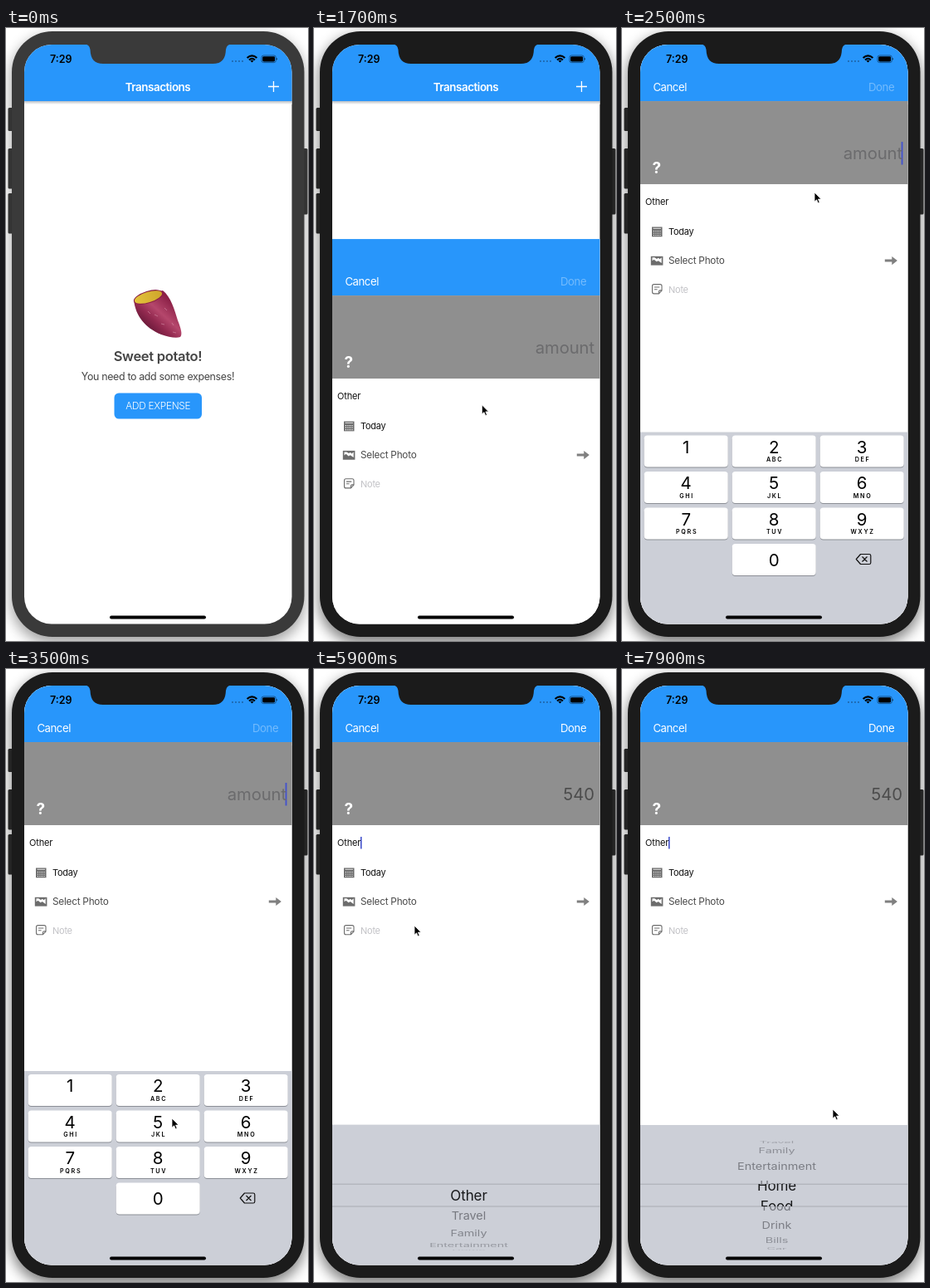
An HTML page that plays this animation: 364 by 738 pixels, repeating every 8000 ms.

```html
<!DOCTYPE html>
<html lang="en">
<head>
<meta charset="utf-8">
<title>Expense entry</title>
<style>
html, body { margin: 0; width: 100%; height: 100%; overflow: hidden; background: #fff; }
svg { display: block; width: 364px; height: 738px; font-family: Inter, Roboto, sans-serif; }
</style>
</head>
<body>
<svg id="stage" viewBox="0 0 364 738" xmlns="http://www.w3.org/2000/svg">
  <defs>
    <filter id="blur" x="-20%" y="-20%" width="140%" height="140%"><feGaussianBlur stdDeviation="8"/></filter>
    <clipPath id="screen"><rect x="22" y="20" width="322.5" height="697.5" rx="33"/></clipPath>
    <clipPath id="band"><rect x="22" y="620" width="323" height="27"/></clipPath>
    <clipPath id="rest"><rect x="22" y="549" width="323" height="71"/><rect x="22" y="647" width="323" height="71"/></clipPath>
    <linearGradient id="edge" x2="0" y2="1"><stop stop-color="#b9bec4"/><stop offset="1" stop-color="#fff"/></linearGradient>
    <linearGradient id="skin" x1=".75" y1=".2" x2=".2" y2=".8">
      <stop stop-color="#8c2147"/><stop offset=".4" stop-color="#b5476c"/>
      <stop offset=".65" stop-color="#932a50"/><stop offset="1" stop-color="#5f1433"/>
    </linearGradient>
    <linearGradient id="flesh" x2="1" y2="0"><stop stop-color="#e3c33c"/><stop offset="1" stop-color="#cfa52b"/></linearGradient>
  </defs>

  <rect width="364" height="738" fill="#fff"/>
  <rect id="shadow" x="6" y="9" width="354" height="732" rx="50" fill="#000" filter="url(#blur)"/>
  <g id="sides">
    <rect x="2.5" y="96" width="7" height="28" rx="1.5"/>
    <rect x="2.5" y="145" width="7" height="48.5" rx="1.5"/>
    <rect x="2.5" y="199" width="7" height="48.5" rx="1.5"/>
    <rect x="356" y="145" width="7.5" height="79.5" rx="1.5"/>
  </g>
  <rect class="shell" x="7" y="4" width="352.5" height="729" rx="49"/>

  <g clip-path="url(#screen)">
    <rect x="22" y="20" width="323" height="698" fill="#fff"/>
    <g id="home">
      <rect x="22" y="88" width="323" height="4" fill="url(#edge)"/>
      <rect x="22" y="20" width="323" height="68" fill="#2896fb"/>
      <path d="M316 70.5h13M322.5 64v13" stroke="#fff" stroke-width="1.3"/>
      <path d="M154 327C156 347 168 361 187 369C196 372 205 374 210 372C213 369 211 362 207 352C203 339 199 324 189 316Z" fill="url(#skin)"/>
      <path d="M179 345l4 2M191 337l3 3M187 356l4 1M200 355l2 3M171 341l3 3M201 366l4 1" stroke="#d590a8" stroke-width="1" opacity=".6"/>
      <ellipse cx="171.5" cy="324" rx="18.3" ry="7.4" transform="rotate(-17 171.5 324)" fill="#8a2045"/>
      <ellipse cx="171.5" cy="324" rx="17.2" ry="6.2" transform="rotate(-17 171.5 324)" fill="url(#flesh)"/>
      <rect x="130.5" y="439.5" width="105.5" height="31" rx="5.5" fill="#2896fb"/>
    </g>

    <g id="modal">
      <rect x="22" y="20" width="323" height="698" fill="#fff"/>
      <rect x="22" y="20" width="323" height="68" fill="#2896fb"/>
      <rect x="22" y="88" width="323" height="100" fill="#8f8f8f"/>
      <g fill="none" stroke="#6c6c6c">
        <path d="M36 239.5h12.5v11.8H36z" fill="#6c6c6c" stroke="none"/>
        <path d="M37.5 241.3h9.5" stroke="#fff" stroke-width=".8"/>
        <path d="M37.8 244.5h9M37.8 247h9M37.8 249.5h9" stroke="#fff" stroke-width="1.1" stroke-dasharray="1.2 1.3"/>
        <path d="M34.8 274.8h14.6v10.8H34.8z" fill="#6c6c6c" stroke="none"/>
        <path d="M36.5 276.3v4l2-1.6 3.2 2.6 2-1.2 4 2.8v-6.6l-2.2 2-1.6-1.5-2 1.2-2.6-1.7z" fill="#fff" stroke="none"/>
        <path d="M38.5 308.6h7.5q2 0 2 2v5.4l-3.6 3.8h-5.9q-2 0-2-2v-7.2q0-2 2-2zM48 315.8h-2q-1.6 0-1.6 1.6v2.4M39 312h6.3M39 314.7h3.6" stroke-width="1.1"/>
        <path d="M316.8 278.5h8.5v-3.6l6.6 5.1-6.6 5.1v-3.6h-8.5z" fill="#808080" stroke="none"/>
      </g>
      <rect id="sumCaret" x="336.6" y="137" width="1.9" height="27.5" fill="#4453cc"/>
      <rect id="kindCaret" x="56" y="202" width="1.6" height="14.5" fill="#4453cc"/>
    </g>

    <g id="panel"><rect x="22" y="484" width="323" height="240" fill="#cccfd7"/><g id="pad"></g></g>
    <g id="picker">
      <path d="M22 620.2h323M22 647h323" stroke="#a9abb2" stroke-width="1"/>
      <g id="dim" clip-path="url(#rest)"></g>
      <g id="lit" clip-path="url(#band)"></g>
    </g>
  </g>

  <path class="shell" d="M94 19Q101 20 101.5 26C102 38 107 43 117 43H249.5C259.5 43 264.5 38 265 26Q265.500 20 272.500 19Z"/>
  <g id="status">
    <g fill="#1c5c99"><circle cx="273" cy="40" r=".9"/><circle cx="277" cy="40" r=".9"/><circle cx="281" cy="40" r=".9"/><circle cx="285" cy="40" r=".9"/></g>
    <g fill="none" stroke="#000" stroke-width="2.1">
      <path d="M290.600 36.100Q296.500 30.600 302.400 36.100M293 38.600Q296.500 35.300 300 38.600"/>
      <path d="M296.500 41.600l-2-2.100q2-1.500 4 0z" fill="#000" stroke="none"/>
    </g>
    <rect x="308" y="33" width="17.300" height="8.600" rx="2.400" fill="none" stroke="#124674" stroke-width=".8"/>
    <rect x="309.200" y="34.200" width="14.900" height="6.200" rx="1.400"/>
    <path d="M326.300 35.800q1.600 1.500 0 3z"/>
  </g>
  <rect x="125" y="707.500" width="116" height="4" rx="2" fill="#000"/>
  <path id="cursor" d="M0 0V11.200L2.600 8.800L4.300 12.800L6.200 12L4.500 8.100H8.100Z" fill="#000" stroke="#fff" stroke-width=".8"/>
</svg>

<script>
const LOOP = 8000;
const $ = id => document.getElementById(id);

function add(parent, tag, attrs, text) {
  const el = document.createElementNS('http://www.w3.org/2000/svg', tag);
  for (const k in attrs) el.setAttribute(k, attrs[k]);
  if (text !== undefined) el.textContent = text;
  parent.append(el);
  return el;
}

function label(parent, text, x, y, size, fill, spacing = 0, extra = {}) {
  return add(parent, 'text', {x, y, fill, 'font-size': size, 'letter-spacing': spacing, ...extra}, text);
}

const MID = {'text-anchor': 'middle'}, END = {'text-anchor': 'end'};
const SEMI = {'font-weight': 600};

label($('status'), '7:29', 53, 41.7, 12.5, '#000', 0, SEMI);

const home = $('home');
label(home, 'Transactions', 183, 75.6, 13.4, '#fff', -.45, {...MID, ...SEMI});
label(home, 'Sweet potato!', 183, 401.3, 16.5, '#444', -.3, {...MID, ...SEMI});
label(home, 'You need to add some expenses!', 183, 423.5, 12.4, '#444', -.33, MID);
label(home, 'ADD EXPENSE', 183.3, 459.2, 11.8, '#fff', -.26, {...MID, 'font-weight': 300});

const modal = $('modal');
label(modal, 'Cancel', 37.4, 75.7, 13.2, '#fff', -.45);
const done = label(modal, 'Done', 297, 75.7, 13.2, '#fff', -.4);
const sum = label(modal, '', 338, 158, 20.3, '#4c4c4c', -.1, END);
label(modal, '?', 36.6, 174.8, 19, '#fff', 0, {'font-weight': 700});
label(modal, 'Other', 28, 213.2, 11, '#111', -.15);
label(modal, 'Today', 56, 249, 11, '#111', -.3);
label(modal, 'Select Photo', 56, 284.1, 11.8, '#4a4a4a', -.25);
label(modal, 'Note', 56, 319.2, 11, '#c2c2c6', -.25);

// Number pad
const letters = ['', 'ABC', 'DEF', 'GHI', 'JKL', 'MNO', 'PQRS', 'TUV', 'WXYZ'];
const keys = {};
function addKey(digit, col, row) {
  const x = 26.7 + col * 106, y = 488 + row * 43.5, cx = x + 50.5;
  const size = {x, width: 101, height: 38, rx: 4};
  add($('pad'), 'rect', {...size, y: y + 1, fill: '#8c8f96'});
  keys[digit] = add($('pad'), 'rect', {...size, y});
  label($('pad'), digit, cx, y + (digit ? 21 : 26.5), 20.5, '#000', 0, MID);
  if (digit && letters[digit - 1])
    label($('pad'), letters[digit - 1], cx + .9, y + 31.7, 7.2, '#000', 1.7, {...MID, ...SEMI});
}
for (let d = 1; d < 10; d++) addKey(d, (d - 1) % 3, Math.floor((d - 1) / 3));
addKey(0, 1, 3);
add($('pad'), 'path', {
  d: 'M287.500 631H298q1.800 0 1.800 1.800v8.400q0 1.800-1.800 1.800H287.500L282.300 637ZM289.500 634l6 6M295.500 634l-6 6',
  fill: 'none', stroke: '#111', 'stroke-width': 1.2, 'stroke-linejoin': 'round'
});

// Category wheel
const STEP = 21.8 * Math.PI / 180, RADIUS = 66, CENTER = 633.6;
const wheel = ['Other', 'Travel', 'Family', 'Entertainment', 'Home', 'Food', 'Drink', 'Bills', 'Car'].map(name => ({
  dim: label($('dim'), name, 0, 5.2, 14.4, '#6c6e75', 0, MID),
  lit: label($('lit'), name, 0, 6.1, 17, '#17181a', -.1, MID)
}));

function turnWheel(pos) {
  wheel.forEach((item, i) => {
    const angle = (i - pos) * STEP, flat = Math.cos(angle);
    const shown = Math.abs(angle) < Math.PI / 2;
    const place = `translate(186.500 ${CENTER + RADIUS * Math.sin(angle)}) scale(1 ${Math.max(flat, .01)})`;
    for (const el of [item.dim, item.lit]) {
      el.setAttribute('transform', place);
      el.setAttribute('visibility', shown ? 'visible' : 'hidden');
    }
    item.dim.setAttribute('opacity', .3 + .65 * Math.max(flat, 0));
  });
}

// Pointer path: time, x, y
const path = [
  [100, 325, 726], [500, 300, 600], [900, 240, 480], [1100, 240, 480], [1400, 198, 455], [1550, 198, 455],
  [1900, 209, 452], [2500, 232, 198], [2850, 232, 198], [3200, 95, 600], [3500, 200, 541],
  [3750, 200, 541], [3900, 189, 547], [4300, 189, 547], [4500, 93, 549], [4580, 93, 549],
  [4750, 180, 632], [4820, 180, 632], [5000, 174, 330], [5100, 157, 296], [5250, 157, 296],
  [5480, 50, 207], [5580, 50, 207], [5900, 121, 309], [6100, 121, 309], [6850, 252, 642],
  [6950, 252, 642], [7900, 254, 530], [8000, 254, 528]
];

function pointer(t) {
  const i = path.findIndex(p => p[0] > t);
  if (i < 1) return i ? path[path.length - 1].slice(1) : [-50, -50];
  const [t0, x0, y0] = path[i - 1], [t1, x1, y1] = path[i];
  const u = (t - t0) / (t1 - t0), e = u * u * (3 - 2 * u);
  return [x0 + (x1 - x0) * e, y0 + (y1 - y0) * e];
}

const within = (t, ...spans) => spans.some(([a, b]) => t >= a && t < b);
const show = (el, on) => el.setAttribute('visibility', on ? 'visible' : 'hidden');
const shift = (el, y) => el.setAttribute('transform', `translate(0 ${y})`);

// Remaining share of a critically damped move
function settle(t, start, rate) {
  const x = Math.max(0, t - start) * rate / 1000;
  return (1 + x) * Math.exp(-x);
}

function draw(t) {
  const active = t >= 1500;
  document.querySelectorAll('.shell').forEach(el => el.setAttribute('fill', active ? '#1b1b1b' : '#3a3a3a'));
  $('sides').setAttribute('fill', active ? '#242424' : '#333');
  $('shadow').setAttribute('opacity', active ? .5 : .36);

  shift(modal, 698 * settle(t, 1520, 12.6));
  show(modal, t > 1520);

  const sumText = t < 4300 ? 'amount' : t < 4600 ? '5' : t < 4850 ? '54' : '540';
  sum.textContent = sumText;
  sum.setAttribute('fill', t < 4300 ? '#6b6b6d' : '#4c4c4c');
  done.setAttribute('opacity', t < 4300 ? .35 : 1);
  $('sumCaret').style.display = within(t, [2100, 2900], [3400, 3850], [4200, 5500]) ? '' : 'none';
  $('kindCaret').style.display = within(t, [5500, 6300], [6700, LOOP]) ? '' : 'none';

  const pressed = within(t, [4200, 4350]) ? 5 : within(t, [4450, 4600]) ? 4 : within(t, [4750, 4850]) ? 0 : -1;
  for (const d in keys) keys[d].setAttribute('fill', +d === pressed ? '#abb3c0' : '#fff');

  const swap = 1 - settle(t, 5500, 18);
  shift($('panel'), 240 * settle(t, 2050, 14.6) + 65 * swap);
  show($('panel'), t > 2050);
  $('pad').setAttribute('opacity', Math.max(0, 1 - swap * 1.02));
  $('picker').setAttribute('opacity', swap);

  const [x, y] = pointer(t);
  $('cursor').setAttribute('transform', `translate(${x} ${y})`);
  turnWheel(t < 6900 ? 0 : (642 - y) / 25);
}

function frame() {
  draw(performance.now() % LOOP);
  requestAnimationFrame(frame);
}
frame();
</script>
</body>
</html>
```
